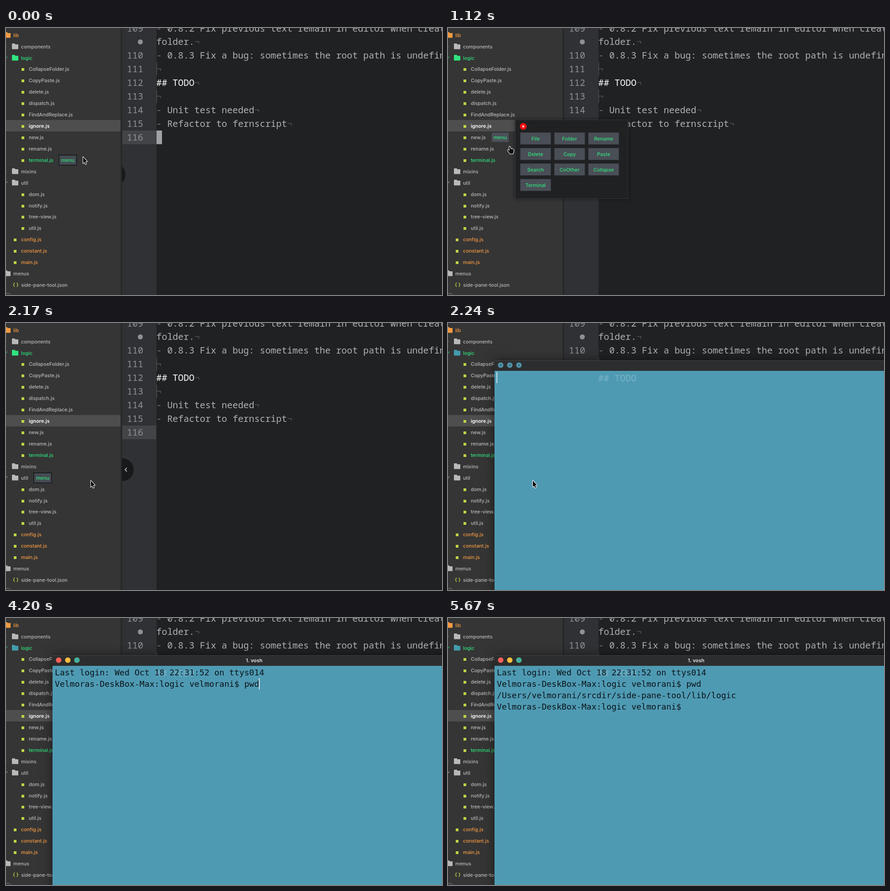
An HTML page with a canvas that plays this animation: 956 px wide and 586 px high, repeating every 5.74 s.

```html
<!DOCTYPE html>
<html lang="en">
<head>
<meta charset="utf-8">
<title>Tree menu demo</title>
<style>
  html, body { margin: 0; width: 100%; height: 100%; overflow: hidden; background: #202123; }
  canvas { display: block; }
</style>
</head>
<body>
<canvas id="stage" width="956" height="586"></canvas>
<script>
const ctx = document.getElementById('stage').getContext('2d');
const LOOP = 5740, STEP = 70;
const UI = '500 10.85px Inter, sans-serif';
const UI_STRONG = '600 10.85px Inter, sans-serif';
const CODE = '19.92px "Noto Sans Mono", monospace', CODE_WIDTH = 11.95;
const SHELL = '18.16px "DejaVu Sans Mono", monospace', SHELL_WIDTH = 10.93;
const GREEN = '#2fe47e', ORANGE = '#f59a42', GREY = '#b9b9b9', LIME = '#c3d346';
const POPUP_OPEN = 980, POPUP_CLOSE = 2120, WINDOW_OPEN = 2240;

// [depth, kind, label, colour]
const tree = [
  [0, 'open', 'lib', ORANGE],
  [1, 'closed', 'components'],
  [1, 'open', 'logic', GREEN],
  ...['CollapseFolder', 'CopyPaste', 'delete', 'dispatch', 'FindAndReplace', 'ignore', 'new', 'rename']
    .map(name => [2, 'js', name + '.js']),
  [2, 'js', 'terminal.js', GREEN],
  [1, 'closed', 'mixins'],
  [1, 'open', 'util'],
  ...['dom', 'notify', 'tree-view', 'util'].map(name => [2, 'js', name + '.js']),
  ...['config', 'constant', 'main'].map(name => [1, 'js', name + '.js', ORANGE]),
  [0, 'open', 'menus'],
  [1, 'json', 'side-pane-tool.json']
];
const SELECTED = 8, MENU_ROW = 9;
const rowY = i => 15.7 + i * 24.92;
const labelX = depth => [16, 33, 50][depth];

const editor = [
  ['109', '- 0.8.2 Fix previous text remain in editor when create a'],
  ['', 'folder.¬'],
  ['110', '- 0.8.3 Fix a bug: sometimes the root path is undefined'],
  ['111', '¬'],
  ['112', '## TODO¬'],
  ['113', '¬'],
  ['114', '- Unit test needed¬'],
  ['115', '- Refactor to fernscript¬'],
  ['116', '']
];
const actions = ['File', 'Folder', 'Rename', 'Delete', 'Copy', 'Paste',
  'Search', 'CoOther', 'Collapse', 'Terminal'];
const PROMPT = 'Velmoras-DeskBox-Max:logic velmorani$ ';

// [time, x, y]
const mousePath = [[0, 168, 282], [210, 166, 280], [630, 116, 243], [980, 115, 242],
  [1120, 136, 260], [1610, 185, 345], [LOOP, 185, 345]];

function rect(x, y, w, h, fill) {
  ctx.fillStyle = fill;
  ctx.fillRect(x, y, w, h);
}
function circle(x, y, r, fill) {
  ctx.fillStyle = fill;
  ctx.beginPath();
  ctx.arc(x, y, r, 0, 7);
  ctx.fill();
}
function text(str, x, y, fill, font, align = 'left') {
  ctx.font = font;
  ctx.textAlign = align;
  ctx.fillStyle = fill;
  ctx.fillText(str, x, y);
}
function line(points, stroke, width = 1) {
  ctx.strokeStyle = stroke;
  ctx.lineWidth = width;
  ctx.beginPath();
  points.forEach(([x, y]) => ctx.lineTo(x, y));
  ctx.stroke();
}
function shadow(blur, alpha, draw) {
  ctx.save();
  ctx.shadowColor = `rgba(0,0,0,${alpha})`;
  ctx.shadowBlur = blur;
  draw();
  ctx.restore();
}
function mouseAt(t) {
  const i = mousePath.findIndex(p => p[0] > t);
  const [t0, x0, y0] = mousePath[i - 1], [t1, x1, y1] = mousePath[i];
  const u = (t - t0) / (t1 - t0), e = u * u * (3 - 2 * u);
  return [x0 + (x1 - x0) * e, y0 + (y1 - y0) * e];
}

function folder(x, y, fill) {
  ctx.fillStyle = fill;
  ctx.beginPath();
  ctx.roundRect(x, y - 7, 7, 5, 1);
  ctx.roundRect(x, y - 5, 14, 10.5, 1);
  ctx.fill();
}
function drawTree(t, hovered) {
  rect(0, 0, 251, 586, '#353535');
  rect(251, 0, 4, 586, '#28292a');
  rect(0, 202, 251, 25, '#4e4e4e');
  tree.forEach(([depth, kind, label, colour = GREY], i) => {
    const y = rowY(i), x = labelX(depth);
    if (kind === 'js') rect(x - 16, Math.round(y - 2), 6, 6, LIME);
    else if (kind === 'json') text('{ }', x - 18, y + 3.5, LIME, UI_STRONG);
    else {
      const tint = label === 'logic' && t >= WINDOW_OPEN ? '#429bad' : colour;
      folder(x - 20, Math.round(y), tint);
      if (depth && kind === 'open') line([[-2, y + 1], [0, y + 1], [3, y - 3]], colour);
      else if (depth) rect(0, y - 1, 1, 2, '#777');
    }
    const active = i === SELECTED;
    text(label, x, y + 4, active ? '#fff' : colour, active ? UI_STRONG : UI);
  });
  ctx.strokeStyle = '#888';
  ctx.lineWidth = 1;
  ctx.beginPath();
  ctx.arc(4, 588, 6, 0, 7);
  ctx.stroke();

  if (t >= WINDOW_OPEN) return;
  const [depth, , label] = tree[hovered];
  ctx.font = UI;
  const x = Math.round(labelX(depth) + ctx.measureText(label).width + 11);
  const y = Math.round(rowY(hovered));
  const pressed = t >= 600 && t < POPUP_CLOSE;
  if (!pressed) rect(x, y - 12, 41, 24, '#1c1e21');
  rect(x + 2, y - 10, 37, 20, pressed ? '#4b5158' : '#454b52');
  text('menu', x + 20.5, y + 4, GREEN, UI, 'center');
}

function drawEditor(t) {
  rect(255, 0, 701, 586, '#202123');
  rect(255, 0, 75, 586, '#303134');
  rect(255, 225, 74, 30, '#434447');
  editor.forEach(([number, str], i) => {
    const y = 7.5 + i * 29.95;
    text(number, 265, y, '#8f9297', CODE);
    const heading = str.startsWith('##'), bullet = str.startsWith('-');
    const end = str.endsWith('¬');
    const body = (end ? str.slice(0, -1) : str).slice(bullet ? 1 : 0);
    if (bullet) text('-', 329.5, y, '#747679', CODE);
    text(body, 329.5 + (bullet ? CODE_WIDTH : 0), y, heading ? '#fff' : '#aeb1b4', CODE);
    if (end) text('¬', 329.5 + CODE_WIDTH * (str.length - 1), y, '#55575a', CODE);
    if (str === '¬') rect(330, y - 22, 1, 29, '#55575a');
  });
  circle(294.5, 30.5, 5.5, '#8d9096');
  if (Math.floor((t + 300) / 800) % 2 === 0) rect(330, 225, 12, 30, '#a0a2a5');
}

function drawHandle(t) {
  const x = 237 + 18 * Math.min(1, t / 210);
  ctx.save();
  ctx.beginPath();
  ctx.rect(254, 290, 40, 64);
  ctx.clip();
  circle(x, 322, 25, '#18191b');
  line([[x + 10, 318], [x + 6, 322], [x + 10, 326]], '#d8d8d8', 1.5);
  ctx.restore();
}

function drawPopup() {
  shadow(8, .5, () => rect(147, 201, 248, 174, '#38393b'));
  rect(148, 202, 246, 172, '#202123');
  circle(165, 216, 7.5, '#f30d12');
  line([[163, 214], [167, 218]], '#fff', 1.4);
  line([[167, 214], [163, 218]], '#fff', 1.4);
  actions.forEach((label, i) => {
    const x = 159 + (i % 3) * 74.6, y = 230 + Math.floor(i / 3) * 34;
    rect(x - 1, y - 1, 68, 27, '#33363b');
    rect(x, y, 66, 25, '#4a4e56');
    text(label, x + 33, y + 16.5, GREEN, UI, 'center');
  });
}

function drawShell(t) {
  const ready = t >= 2380;
  shadow(22, .5, () => rect(102, 82, 870, 520, '#2c2d2e'));
  rect(102, 82, 854, 1, '#444648');
  rect(102, 105, 854, 481, '#4f9ab3');
  ['#f9605a', '#fabd3f', '#45bd8b'].forEach((fill, i) => {
    const x = 115.5 + i * 20;
    circle(x, 92.5, 6, ready ? fill : '#5295aa');
    if (!ready) circle(x, 92.5, 2.5, '#3d7387');
    else if (i === 2) circle(x, 92.5, 3.5, '#4aa4b5');
  });
  text('## TODO', 329.5, 127.5, 'rgba(190,222,232,.38)', CODE);
  if (ready) text(t < 3360 ? '1. Shell' : '1. vosh', 544, 97, '#eee', UI_STRONG, 'center');

  const typed = 'pwd'.slice(0, Math.max(0, Math.floor((t - 3780) / 140)));
  const lines = [];
  if (t >= 2520) lines.push('Last login: Wed Oct 18 22:31:52 on ttys014');
  if (t >= 2940) lines.push(PROMPT + typed);
  else lines.push('');
  if (t >= 4690) lines.push('/Users/velmorani/srcdir/side-pane-tool/lib/logic', PROMPT);
  lines.forEach((str, i) => text(str, 107, 126 + i * 25, '#0b1419', SHELL));

  const typing = t >= 3780 && t < 4620;
  if (typing || Math.floor((t - WINDOW_OPEN) / 490) % 2 === 0) {
    const row = lines.length - 1;
    rect(106.5 + lines[row].length * SHELL_WIDTH, 107 + row * 25, 1.5, 25, '#eef7fa');
  }
}

function outline(points) {
  ctx.beginPath();
  points.forEach(([x, y]) => ctx.lineTo(x, y));
  ctx.closePath();
  ctx.lineWidth = 2;
  ctx.lineJoin = 'round';
  ctx.strokeStyle = '#fff';
  ctx.stroke();
  ctx.fillStyle = '#0c0c0c';
  ctx.fill();
}
function drawMouse(t, x, y) {
  if (t >= 3780) return;
  ctx.save();
  ctx.translate(x, y);
  if (t >= 2800) {
    const beam = [[0, -5], [0, 8]];
    line(beam, '#e8f2f5', 3);
    line([[-3, -6], [0, -5], [3, -6]], '#e8f2f5', 2);
    line([[-3, 9], [0, 8], [3, 9]], '#e8f2f5', 2);
    line(beam, '#15252c');
    line([[-2, 2], [2, 2]], '#15252c');
  } else if (t >= 600 && t < POPUP_CLOSE) {
    outline([[-2, 1], [0, 0], [2, 6], [5, 5], [8, 7], [8, 12], [6, 16], [0, 16], [-5, 9], [-4, 7], [-1, 9]]);
  } else {
    outline([[1, 1], [1, 15], [4, 12], [6, 17], [8, 16], [6, 11], [10, 11]]);
  }
  ctx.restore();
}

function render() {
  const t = Math.floor(performance.now() % LOOP / STEP) * STEP;
  const [x, y] = mouseAt(t);
  const popup = t >= POPUP_OPEN && t < POPUP_CLOSE;
  drawEditor(t);
  drawTree(t, popup ? MENU_ROW : Math.floor((y - 3.5) / 24.9));
  drawHandle(t);
  if (popup) drawPopup();
  if (t >= WINDOW_OPEN) drawShell(t);
  drawMouse(t, x, y);
  requestAnimationFrame(render);
}
render();
</script>
</body>
</html>
```
